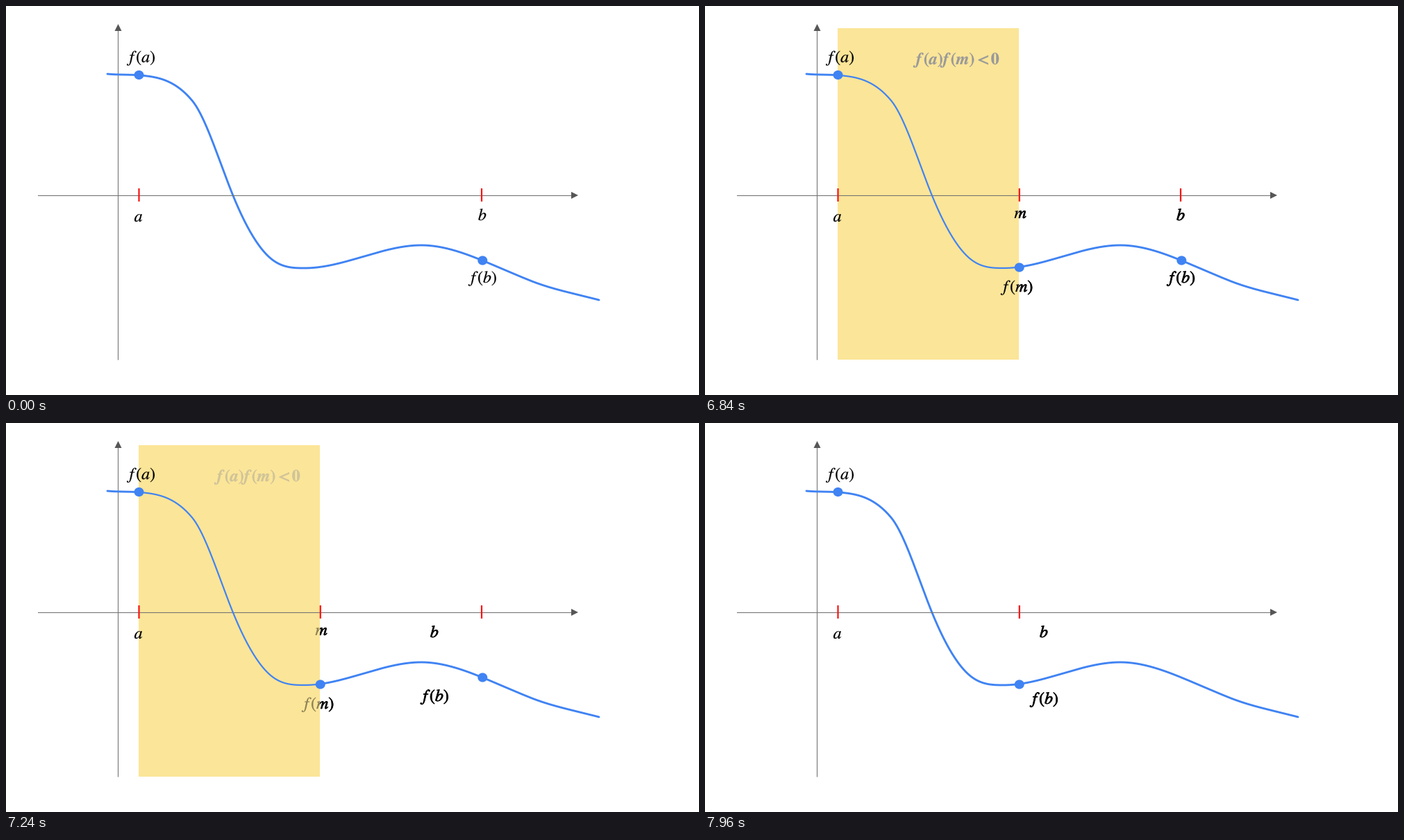
Animation, 998 px wide and 561 px high, one loop 8000 ms. Source, as a matplotlib script:

```python
import numpy as np
import matplotlib.pyplot as plt
from matplotlib.animation import FuncAnimation
from matplotlib.patches import Ellipse, PathPatch, Polygon, Rectangle
from matplotlib.textpath import TextPath
from matplotlib.transforms import Affine2D

W, H, DPI = 998, 561, 128
PX = 72 / DPI  # points per pixel
STEP, LOOP = 40, 8000
BLUE, RED, GREY, DARK = "#4083f3", "#f91212", "#757575", "#565656"
A, M, B = 191.5, 452.8, 685.0
AXIS_X, AXIS_Y = 161.5, 273
THIN, BOLD = 0.25 * PX, 0.8 * PX

SHOW_M, SHOW_BAND, MOVE_B, DROP_BAND = 480, 3640, 6840, 7280

plt.rcParams["mathtext.fontset"] = "stix"
fig = plt.figure(figsize=(W / DPI, H / DPI), dpi=DPI, facecolor="white")
ax = fig.add_axes([0, 0, 1, 1])
ax.set(xlim=(0, W), ylim=(H, 0))
ax.axis("off")


def hermite(x, knots):
    """Cubic curve through knots given as (x, y, slope)."""
    kx, ky, ks = np.array(knots, float).T
    i = np.clip(np.searchsorted(kx, x, side="right") - 1, 0, len(kx) - 2)
    h = kx[i + 1] - kx[i]
    u = (x - kx[i]) / h
    rise = u * u * (3 - 2 * u)
    bend = u * (1 - u) * h * (ks[i] * (1 - u) - ks[i + 1] * u)
    return ky[i] + (ky[i + 1] - ky[i]) * rise + bend


def line(xs, ys, color, width, z, **kw):
    return ax.plot(xs, ys, color=color, lw=width * PX, zorder=z, **kw)[0]


def tick(x):
    return line([x, x], [263, 282], RED, 2.2, 6, solid_capstyle="butt", snap=False)


def dot(x, y):
    return ax.add_patch(Ellipse((x, y), 14, 13.2, color=BLUE, lw=0, zorder=7))


def place(art, x, y):
    art.set_transform(Affine2D().scale(1, -1).translate(x, y) + ax.transData)


def label(x, y, text, color="black", clip=None):
    """Formula as an outline, centred on x with its baseline at y."""
    path = TextPath((0, 0), f"${text}$", size=24)
    box = path.get_extents()
    path = path.transformed(Affine2D().translate(-(box.x0 + box.x1) / 2, 0))
    art = ax.add_patch(PathPatch(path, color=color, lw=THIN, zorder=8))
    place(art, x, y)
    if clip is not None:
        art.set_clip_path(clip)
    return art


def region(x0, x1, y0=0, y1=H):
    return Rectangle((x0, y0), x1 - x0, y1 - y0, transform=ax.transData)


# Axes and curve
line([46, 816], [AXIS_Y] * 2, GREY, 1.1, 4)
line([AXIS_X] * 2, [34, 510], GREY, 1.1, 1, snap=False)
ax.add_patch(Polygon([(824, 273), (814, 268), (814, 278)], color=DARK, lw=0, zorder=4))
ax.add_patch(Polygon([(AXIS_X, 26), (AXIS_X - 5, 36), (AXIS_X + 5, 36)],
                     color=DARK, lw=0, zorder=4))

KNOTS = [(146, 98, .1), (191, 99.8, .08), (268, 136.3, 1.2), (327, 273.5, 2.45),
         (380, 363, .88), (430, 378, 0), (598, 345, 0), (686, 367, .41),
         (755, 396, .4), (854, 424, .27)]
xs = np.linspace(146, 854, 500)
ys = hermite(xs, KNOTS)
line(xs, ys, BLUE, 2.9, 2, solid_capstyle="round")

# Highlighted interval, with the curve drawn thinner on top of it
band = ax.add_patch(Rectangle((191, 32), 261, 477.5, color="#fbe598", lw=0, zorder=3))
thin_curve = line(xs, ys, BLUE, 2.2, 5)
thin_curve.set_clip_path(region(191, 452, 32, 509))
formula = label(361.5, 84, r"\boldsymbol{f\,(a)f\,(m)<0}", "#999999")

# Interval ends and midpoint
tick(A)
dot(A, 99.5)
label(194, 81, r"f\,(a)")
label(190.5, 311, "a")
b_marks = [tick(B), dot(686.3, 367)]
m_marks = [tick(M), dot(452.7, 377)]
inside, outside = region(0, 452), region(452, W)
M_TEXTS = [(454, 306, "m"), (448.5, 412, r"f\,(m)")]
m_inside = [label(*spec, clip=inside) for spec in M_TEXTS]
m_outside = [label(*spec, clip=outside) for spec in M_TEXTS]
B_X = 685.8
b_text = label(B_X, 309, "b")
fb_text = label(B_X, 399, r"f\,(b)")

# (time, distance, speed) of the label pair sliding left
SLIDE = [(6800, 0, 0), (7120, 42, .22), (7280, 78, .222),
         (7640, 154, .19), (7960, 198, .085)]


def show(arts, on):
    for art in arts:
        art.set_visible(on)


def embolden(arts, on):
    for art in arts:
        art.set_linewidth(BOLD if on else THIN)


def update(frame):
    t = frame * STEP
    banded = SHOW_BAND <= t < DROP_BAND
    show([band, thin_curve, formula], banded)
    show(m_marks, t >= SHOW_M)
    show(m_inside + m_outside, SHOW_M <= t < DROP_BAND)
    show(b_marks, t < DROP_BAND)
    embolden(m_outside, banded)
    embolden([b_text, fb_text], t >= MOVE_B)

    fade = 1 - 0.4 * np.clip((t - MOVE_B) / 280, 0, 1.5)
    for art in m_inside + [formula]:
        art.set_alpha(fade)

    shift = float(hermite(max(t, SLIDE[0][0]), SLIDE))
    place(b_text, B_X - shift, 309)
    place(fb_text, B_X - shift, 399 + 0.03 * shift)
    return []


anim = FuncAnimation(fig, update, frames=LOOP // STEP, interval=STEP,
                     init_func=lambda: update(0), repeat=True, repeat_delay=0)
plt.show()
```
